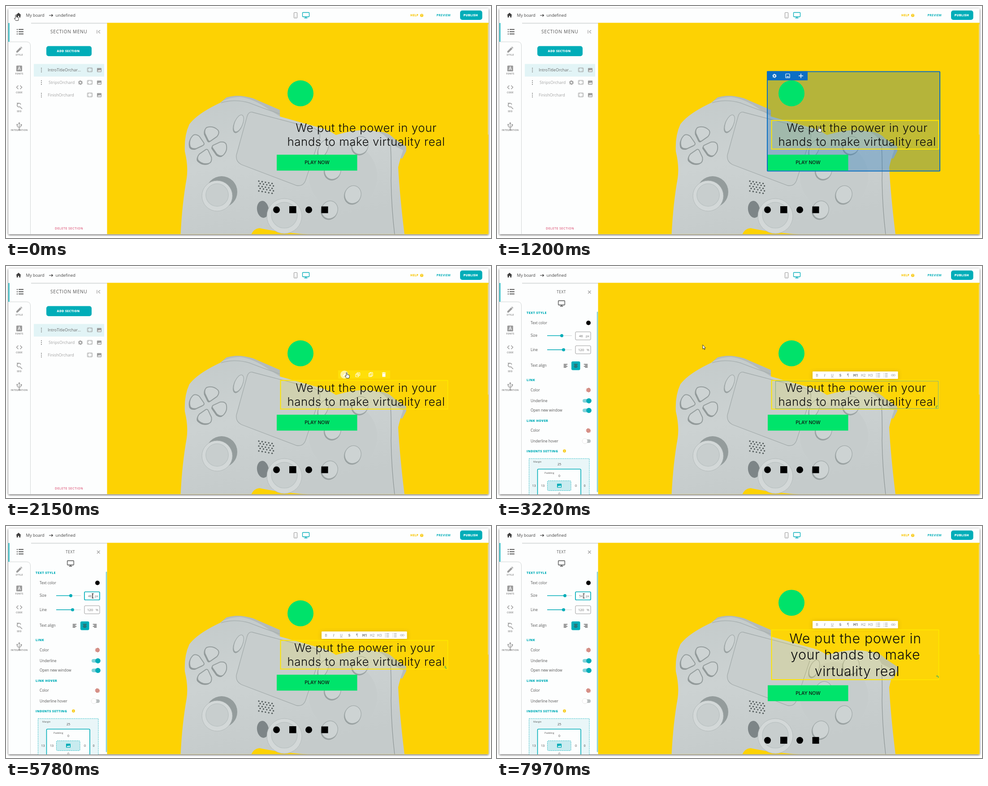
An HTML page that plays this animation: 1082 by 518 pixels, repeating every 8000 ms.

```html
<!DOCTYPE html>
<html lang="en">
<head>
<meta charset="utf-8">
<title>Page editor</title>
<style>
html, body { margin: 0; width: 100%; height: 100%; overflow: hidden; background: #fff; }
svg { display: block; width: 100vw; height: 100vh; font-family: "Open Sans", sans-serif; }
.head { font-family: Inter, sans-serif; font-weight: 300; letter-spacing: .021em; }
.play { font-family: Inter, sans-serif; }
</style>
</head>
<body>
<svg id="stage" viewBox="0 0 1082 518"></svg>
<script>
const TEAL = '#00adb8', GREY = '#9c9c9c', DARK = '#484848', YELLOW = '#fdd203', LEMON = '#ffe500';
const LOOP = 8000;
const stage = document.getElementById('stage');

// Markup helpers
const text = (x, y, s, size, fill = '#666', o = {}) =>
  `<text x="${x}" y="${y + size * .36}" font-size="${size}" fill="${fill}" font-weight="${o.w || 400}"
    text-anchor="${o.mid ? 'middle' : 'start'}" letter-spacing="${o.ls || 0}" ${o.more || ''}>${s}</text>`;
const rect = (x, y, w, h, fill, r = 0, more = '') =>
  `<rect x="${x}" y="${y}" width="${w}" height="${h}" rx="${r}" fill="${fill}" ${more}/>`;
const disc = (x, y, r, fill, more = '') => `<circle cx="${x}" cy="${y}" r="${r}" fill="${fill}" ${more}/>`;
const oval = (x, y, rx, ry, turn, fill, more = '') =>
  `<ellipse cx="${x}" cy="${y}" rx="${rx}" ry="${ry}" transform="rotate(${turn} ${x} ${y})" fill="${fill}" ${more}/>`;
const shape = (d, fill, more = '') => `<path d="${d}" fill="${fill}" ${more}/>`;
const line = (d, c, w = 1, more = '') =>
  `<path d="${d}" fill="none" stroke="${c}" stroke-width="${w}" ${more}/>`;
const group = (id, s, more = '') => `<g id="${id}" ${more}>${s}</g>`;
const at = (x, y, s) => `<g transform="translate(${x} ${y})">${s}</g>`;

// Icons, drawn around their centre
const picture = (x, y, c, hole) => at(x, y, rect(-5, -4.5, 10, 9, c, 1) +
  shape('M-4 3L-1.6 0L0 1.7L2 -1L4.2 3Z', hole));
const frame = (x, y) => at(x, y, rect(-5.5, -4.5, 11, 9, 'none', 1, `stroke="${GREY}"`) +
  line('M-3.5 -1V-2.7H-1.5M1.5 -2.7H3.5V-1M3.5 1V2.7H1.5M-1.5 2.7H-3.5V1', GREY, .9));
const gear = (x, y, c, k = 1) => at(x, y, disc(0, 0, 3.2 * k, 'none', `stroke="${c}" stroke-width="${2 * k}"`) +
  disc(0, 0, 4.6 * k, 'none', `stroke="${c}" stroke-width="${1.4 * k}" stroke-dasharray="${2.4 * k} ${2.42 * k}"`));
const monitor = (x, y, c, w) => at(x, y, rect(-w / 2, -6, w, 9.5, 'none', 1, `stroke="${c}" stroke-width="1.3"`) +
  line('M0 3.5V6M-3.5 6.2H3.5', c, 1.4));
const dots = (x, y) => [-4, 0, 4].map(d => disc(x, y + d, 1.1, '#777')).join('');
const alignIcon = (x, y, c, side) => [8.5, 6, 8.5, 6].map((w, i) => {
  const dx = side * (8.5 - w) / 2;
  return rect(x - w / 2 + dx, y - 4.2 + i * 2.3, w, 1.2, c);
}).join('');
const caps = (x, y, s, fill = TEAL, size = 7, ls = .5) => text(x, y, s, size, fill, { w: 800, ls });

function controller() {
  const edge = 'stroke="#a3abab" stroke-width="1.3"';
  const key = (x, y, rx, ry, turn) => oval(x - 1, y + 2, rx + .8, ry + .8, turn, '#969e9e') +
    oval(x, y, rx, ry, turn, '#cdd3d3', edge);
  const padShape = 'M-13 -38Q0 -46 13 -38Q18 -33 14 -24L3 -11Q0 -8 -3 -11L-14 -24Q-18 -33 -13 -38Z';
  const pad = turn => `<g transform="rotate(${turn})">` + shape(padShape, '#cdd3d3', 'stroke="#959d9d" stroke-width="2"') + '</g>';
  const padShade = turn => `<g transform="translate(-2 2.5) rotate(${turn})">` + shape(padShape, '#8f9797') + '</g>';
  const turns = [15, 105, 195, 285];
  const grip = (x, y, r) => disc(x, y, r, '#d3d8d8', 'stroke="#b4bbbb"') +
    disc(x, y - 2, r * .74, '#c8cece', 'stroke="#bcc4c4" stroke-width="1.5"');
  let s = shape('M492 204Q518 196 551 206L611 232V248L560 240L478 216Z', '#b4bbbb') +
    shape('M828 281Q850 279 866 296L893 314V324L884 341L850 330Z', '#b6bdbd') +
    shape('M389.500 510Q393 440 403 385Q407 358 399 325Q397 290 409 264Q427 240 478 216Q492 204 522 203Q552 207 585 230L612 247L694 270Q718 275 736 288Q792 271 830 281Q849 288 858 308L886 322Q879 342 875 360Q878 420 889 510Z', 'url(#shell)') +
    shape('M547 511Q552 497 566 496Q610 506 690 511Z', YELLOW) +
    line('M858 310Q860 350 859 390Q860 450 867 510', '#8c9494', 1.2) +
    line('M480 216Q510 207 542 216Q575 229 611 241', '#a9b1b1', 1.5) +
    shape('M549 237L687 273Q703 280 700 294L668 390Q663 403 649 401L525 354Q512 347 514 333L538 246Q541 236 549 237Z',
      '#c7cdcd', edge) +
    disc(752, 380, 76, '#c6cccc');
  s += at(451, 311, turns.map(padShade).join('') + turns.map(pad).join(''));
  s += key(519, 262, 9, 20, 22) + key(708, 318, 10, 20, 22);
  s += [[790, 311], [729, 367], [774, 421], [722, 455]].map(p => key(...p, 18, 20, 20)).join('');
  for (let r = 0; r < 5; r++)
    for (let c = 0; c < 5; c++)
      s += disc(564 + c * 7.4 + r % 2 * 3, 391 + r * 5.5 + c * 1.3, 1.7, '#555d5d');
  return s + disc(481, 415, 35, '#949c9c') + grip(471, 424, 34) + oval(573, 454, 13, 19, -8, '#7d8587') + grip(621, 469, 39);
}

function chrome() {
  const rail = [[110, 'STYLE'], [152, 'FONTS'], [194, 'CODE'], [236, 'SEO'], [278, 'INTEGRATION']];
  return shape('M28 15L34 20.5H32.3V25.5H29.3V22H26.7V25.5H23.7V20.5H22Z', '#3d3d3d') +
    text(44.5, 20.5, 'My board', 9.3, '#444') + line('M96 21H104M101.5 18.5L104.3 21L101.5 23.5', '#333', 1.2) +
    text(110.5, 20.5, 'undefined', 9.3, '#444') +
    rect(642.5, 14.5, 7, 12.5, 'none', 1.2, `stroke="${GREY}" stroke-width="1.2"`) + rect(645, 24.5, 2, 1, GREY) +
    monitor(669, 20.5, TEAL, 15) +
    caps(902, 21, 'HELP', '#f8cb1c', 6.7, .3) + disc(927.5, 21, 3.6, '#f8cb1c') +
    text(927.5, 21, '?', 5.5, '#fff', { w: 700, mid: 1 }) + text(960.5, 20.5, 'PREVIEW', 6.6, TEAL, { w: 700, ls: .4 }) +
    rect(1013, 10, 49.5, 21, TEAL, 5) + caps(1020.5, 20.5, 'PUBLISH', '#fff', 7, .3) +
    line('M56 38.5H226', '#d9dddd', 2) + rect(5.5, 38, 2, 42, TEAL) +
    line('M7 80H46Q54.500 80 54.500 89V510', '#d2d5d5') +
    [52.5, 57.5, 62.5].map(y => rect(24, y - 1, 2, 2, DARK) + rect(28, y - 1, 11, 1.8, DARK)).join('') +
    rail.map(([y, s]) => text(29.5, y - 1, s, 5.1, '#8e8e8e', { w: 700, mid: 1, ls: .3 })).join('') +
    shape('M23 104V101L31.500 92.500L34.500 95.500L26 104ZM32.300 91.700L33.500 90.500L36.500 93.500L35.300 94.700Z', GREY) +
    rect(23, 133, 13, 13, GREY, 1.5) + text(29.5, 139.5, 'A', 10, '#fff', { w: 600, mid: 1 }) +
    line('M27.500 177.500L23.500 181.500L27.500 185.500M31.500 177.500L35.500 181.500L31.500 185.500', GREY, 1.5) +
    line('M33 220A4.200 4.200 0 1 0 31 225L36 230M24 217H28', GREY, 1.6) +
    line('M29.500 261V275M25 265V268Q25 270 29.500 271Q34 270 34 266', GREY, 1.4) +
    shape('M27 263L29.500 259L32 263Z', GREY) + disc(29.5, 276, 1.9, GREY) + rect(32.5, 264, 3, 3, GREY) + disc(25, 265, 1.7, GREY);
}

function menu() {
  const row = (x, y, s, c) => dots(79, y) + text(x, y, s, 9, c) + frame(187, y - .5) + picture(208, y, GREY, '#fff');
  return text(99, 57, 'SECTION MENU', 10, '#555', { ls: .8 }) +
    line('M203 53.500V61.500M210 54L206 57.500L210 61', GREY, 1.2) +
    rect(90, 89.5, 101, 22.5, TEAL, 5) + caps(113.5, 100.5, 'ADD SECTION', '#fff', 6.8, .45) +
    rect(62, 129.5, 157, 28, '#e2f4f6') + row(93, 143, 'IntroTitleOrchar...', '#666') +
    row(95, 171, 'StripsOrchard', '#a3a3a3') + gear(166, 171, GREY, .95) + row(93, 199, 'FinishOrchard', '#a3a3a3') +
    text(109, 497, 'DELETE SECTION', 6.9, '#de5c7c', { w: 600, ls: .6 });
}

function settings() {
  const label = (y, s) => text(75, y, s, 8.2, '#555');
  const slider = (y, x, id) => line(`M112 ${y}H167`, '#cfd4d4') +
    group(id, line(`M112 ${y}H${x}`, TEAL, 1.3) + disc(x, y, 3.5, TEAL));
  const field = (y, v, unit, id) => rect(175, y - 9, 34, 18, '#fff', 2, `id="${id}Box" stroke="#9a9a9a"`) +
    text(183 - (v > 99) * 2, y, v, 7.6, '#666', { more: `id="${id}"` }) + text(198 + (v > 99) * 2, y + .5, unit, 7.2, '#777');
  const swatch = y => disc(204, y, 5, '#f3d9d2') + disc(204, y, 5, 'url(#checks)');
  const toggle = (y, on) => rect(191, y - 4, 18, 8, on ? '#7fd2d9' : '#b9bdbd', 4) +
    disc(on ? 205 : 196, y, 5.8, on ? TEAL : '#fff', on ? '' : 'stroke="#ddd" stroke-width=".7"');
  const num = (x, y, s) => text(x, y, s, 7.2, '#444', { mid: 1 });
  const dash = `stroke="${TEAL}" stroke-width=".8" stroke-dasharray="2.5 1.5"`;
  return text(143.5, 58.5, 'TEXT', 8.2, '#555', { mid: 1, ls: .5 }) +
    line('M203 55L209.500 61.500M209.500 55L203 61.500', GREY, 1.2) + monitor(144, 83.5, DARK, 14.5) +
    caps(66, 104, 'TEXT STYLE') + label(127, 'Text color') + disc(204, 127, 5, '#000') +
    label(155.5, 'Size') + slider(155.5, 144.5, 'knob') + field(156, 46, 'px', 'size') +
    label(187, 'Line') + slider(187, 148.5, 'lineKnob') + field(187, 120, '%', 'height') +
    label(222.5, 'Text align') + rect(166, 213, 19.5, 19.5, TEAL, 3) +
    alignIcon(153, 223, DARK, -1) + alignIcon(175.7, 223, DARK, 0) + alignIcon(198, 223, DARK, 1) +
    caps(66, 254, 'LINK') + label(277, 'Color') + swatch(277) +
    label(301, 'Underline') + toggle(301, true) + label(322.5, 'Open new window') + toggle(322.5, true) +
    caps(66, 345, 'LINK HOVER') + label(367, 'Color') + swatch(367.5) +
    label(391, 'Underline hover') + toggle(391, false) + caps(66, 413, 'INDENTS SETTING') +
    disc(150.5, 413, 3.4, '#f8cb1c') + text(150.5, 413, 'i', 5, '#fff', { w: 700, mid: 1 }) +
    rect(71.5, 430, 134.5, 90, '#e9f6f8', 0, dash) + text(81, 437, 'Margin', 5.7, '#555') + num(139, 442.5, 25) +
    rect(90.5, 453.5, 96.5, 70, '#fdfefe', 2, `stroke="${TEAL}" stroke-width="1.6"`) +
    text(106, 462, 'Padding', 5.7, '#555') + num(139, 468.5, 0) +
    rect(112.5, 479.5, 52.5, 22, '#c8ebef', 2, dash) + picture(139, 490.5, TEAL, '#fff') +
    num(82.5, 490, 13) + num(102, 490, 13) + num(176, 490, 0) + num(195.5, 490, 0) + num(139, 508.5, 0) +
    rect(222.7, 102, 2.8, 403, '#84d3da', 1.4);
}

function sectionFrame() {
  const blue = '#0b6ec4';
  return rect(603, 146.5, 385, 222, 'rgb(16 110 186 / .3)', 1, `stroke="${blue}" stroke-width="2"`) +
    rect(602, 145.5, 91, 20.5, blue, 1) + gear(619, 156, '#fff', .85) +
    rect(644, 151.5, 9, 9, 'none', 1, 'stroke="#fff" stroke-width="1.2"') + shape('M645.500 159L647.500 156.500L649 158L650.200 156.800L651.800 159Z', '#fff') +
    line('M678 151V161M673 156H683', '#fff', 1.5);
}

function hoverTools() {
  const w = 'stroke="#fff" stroke-width="1.1"';
  return rect(741, 233, 116, 18.5, '#ffdf08', 1) + disc(755, 242.5, 9, '#fff3a0') + line('M752 246L758 240', '#fff', 2.4) +
    rect(780, 241, 6.5, 6.5, 'none', 1, w) + rect(783, 238, 6.5, 6.5, 'none', 1, w) + line('M786.200 239.500V243M784.500 241.200H788', '#fff') +
    rect(809.5, 239, 6, 8, 'none', 1, w) + rect(812, 237.5, 6, 8, 'none', 1, w) +
    shape('M839.500 240H846.500V247.500H839.500ZM838.700 237.800H841.500L842 237H844L844.500 237.800H847.300V239.200H838.700Z', '#fff');
}

function formatBar() {
  const mark = (x, s, c = '#a9a9a9', more = '') => text(x, 244, s, 8, c, { w: 600, mid: 1, more });
  const list = (x, bullet) => [-3.5, 0, 3.5].map(d => rect(x - 4.5, 243.5 + d, bullet, 1.2, '#999') + rect(x - 1.5, 243.5 + d, 6, 1.1, '#999')).join('');
  return rect(704, 235.5, 190.5, 16.5, '#fff', 1, 'filter="url(#soft)"') +
    mark(714, 'B') + mark(731, 'I', '#888', 'font-style="italic"') + mark(748, 'U', '#a9a9a9', 'text-decoration="underline"') +
    mark(766, 'S', '#777', 'text-decoration="line-through"') + mark(783, '¶') + mark(800, 'H1', '#444') +
    mark(817, 'H2') + mark(833, 'H3') + list(850, 1.6) + list(867, 1) +
    rect(879.7, 242, 4.5, 3.6, 'none', 1.8, 'stroke="#aaa"') + rect(883.8, 242, 4.5, 3.6, 'none', 1.8, 'stroke="#aaa"');
}

const pointer = 'stroke="#222" stroke-width=".9" stroke-linejoin="round"';
stage.innerHTML = `<defs>
  <linearGradient id="shell" x1="0" y1="0" x2=".3" y2="1"><stop offset="0" stop-color="#c3caca"/><stop offset=".5" stop-color="#ccd2d2"/><stop offset="1" stop-color="#c5cbcb"/></linearGradient>
  <pattern id="checks" width="4" height="4" patternUnits="userSpaceOnUse">${rect(0, 0, 2, 2, '#b8473c') + rect(2, 2, 2, 2, '#b8473c')}</pattern>
  <filter id="shadow" x="-5%" y="-5%" width="110%" height="110%"><feDropShadow dx="0" dy="1.3" stdDeviation="2" flood-color="#000" flood-opacity=".75"/></filter>
  <filter id="soft" x="-10%" y="-80%" width="120%" height="260%"><feDropShadow dx="0" dy="1" stdDeviation="4" flood-color="#604800" flood-opacity=".3"/></filter>
  <clipPath id="view">${rect(225.5, 37.5, 851, 472, '#fff')}</clipPath>
  <clipPath id="window">${rect(5, 5, 1072, 505, '#fff', 2)}</clipPath></defs>` +
  rect(0, 0, 1082, 518, '#fff') + rect(5.5, 5.5, 1071, 504, '#fdfefe', 1, 'filter="url(#shadow)"') +
  `<g clip-path="url(#window)">${chrome() + group('menu', menu()) + group('settings', settings())}</g>
  <g clip-path="url(#view)">` + rect(225, 37, 852, 473, YELLOW) + controller() + rect(1075, 41, 2, 246, '#e9dfa8') +
  group('section', sectionFrame()) +
  group('up', disc(657, 195, 29, '#00e26a') + group('tools', hoverTools()) + group('format', formatBar())) +
  rect(612.5, 255.5, 373, 64, 'rgb(255 226 30 / .16)', 0, `id="textBox" stroke="${LEMON}" stroke-width="2"`) +
  rect(621.5, 257, 363, 61.5, 'none', 0, 'id="focus" stroke="#7fae86"') +
  [0, 1, 2].map(i => `<text id="line${i}" class="head" text-anchor="middle" fill="#0b0b0b"/>`).join('') +
  group('spin', line('M0 -2.500A2.500 2.500 0 0 1 0 2.500', '#35a86b', 1.3)) +
  group('down', rect(604, 332, 179.5, 35.5, '#00e46b') +
    text(694, 349.5, 'PLAY NOW', 10.4, '#111', { w: 500, mid: 1, more: 'class="play"' }) +
    disc(603.5, 455, 7.5, '#000') + rect(632, 447, 15.5, 15.5, '#000') + disc(675.5, 455, 7.5, '#000') + rect(703.5, 447.5, 15, 15, '#000')) +
  '</g>' + line('M193 151V161', '#333', .8, 'id="caret"') +
  group('cursor',
    group('hand', shape('M-2.500 1V-5.500Q-1.500 -7.500 -.5 -5.500V-1.500L3.500 -.7Q5 -.2 4.800 1.500L3.800 6.500H-1.700L-5 2Q-5 .2 -2.500 2Z', '#fff', pointer)) +
    group('arrow', shape('M-2.500 -5V4.500L-.3 2.500L1.300 6L2.700 5.300L1.200 2H4Z', '#fff', pointer)) +
    group('beam', line('M-2.200 -5H-.6L0 -4.400L.6 -5H2.200M0 -4.400V4.400M-2.200 5H-.6L0 4.400L.6 5H2.200', '#222', 1.1)));

const el = id => document.getElementById(id);
const show = (id, on) => el(id).setAttribute('visibility', on ? 'visible' : 'hidden');
const move = (id, x, y, turn = 0) => el(id).setAttribute('transform', `translate(${x} ${y}) rotate(${turn})`);
const set = (id, o) => { for (const k in o) el(id).setAttribute(k, o[k]); };

const smooth = u => u * u * (3 - 2 * u), start = u => u * u, stop = u => 1 - (1 - u) * (1 - u);
// time, x, y, easing towards this point
const path = [[590, 23.5, 26], [1200, 719.5, 275, smooth], [1540, 719.5, 275, smooth], [1950, 761.5, 244, smooth],
  [2760, 761.5, 244, smooth], [3220, 462, 181, start], [4060, 193.5, 156, stop]];
const steps = [6090, 6270, 6450, 6640, 6920, 7200, 7480, 7810];

function cursorAt(t) {
  const i = path.findIndex(p => p[0] > t);
  if (i === 0) return path[0].slice(1);
  if (i < 0) return path[path.length - 1].slice(1);
  const [t0, x0, y0] = path[i - 1], [t1, x1, y1, ease] = path[i];
  const u = ease((t - t0) / (t1 - t0));
  return [x0 + (x1 - x0) * u, y0 + (y1 - y0) * u];
}

function wrap(size) {
  if (size < 48) return ['We put the power in your', 'hands to make virtuality real'];
  if (size < 53) return ['We put the power in your', 'hands to make virtuality', 'real'];
  return ['We put the power in', 'your hands to make', 'virtuality real'];
}

function render(t) {
  const [x, y] = cursorAt(t);
  const edit = t >= 2700, tools = t >= 1520 && !edit, focused = t >= 4400;
  const inside = x > 602 && y > 146;
  const size = 46 + steps.filter(s => t >= s).length;
  const lines = wrap(size), font = size * .5618, lead = font * 1.2;
  const grow = (lines.length * lead - 62) / 2;

  show('menu', !edit);
  show('settings', edit);
  show('section', inside && t < 1520);
  show('tools', tools);
  show('format', edit);
  show('textBox', edit || tools || (inside && y > 255));
  show('focus', edit && !focused);
  show('spin', edit);

  move('up', 0, -grow);
  move('down', 0, grow);
  set('textBox', { y: 255.5 - grow, height: 64 + 2 * grow });
  move('spin', 982, 315 + grow * .95, t * .4);
  for (let i = 0; i < 3; i++) {
    const shift = edit && i < lines.length - 1 ? font * .13 : 0;
    set('line' + i, { x: 803.5 - shift, y: 287.5 + (i - (lines.length - 1) / 2) * lead + font * .3585, 'font-size': font });
    el('line' + i).textContent = lines[i] || '';
  }

  const knob = 144.5 + (size - 46) * .875;
  el('knob').innerHTML = line(`M112 155.500H${knob}`, TEAL, 1.3) + disc(knob, 155.5, 3.5, TEAL);
  el('size').textContent = size;
  set('sizeBox', { stroke: t >= 4050 ? TEAL : '#9a9a9a', 'stroke-width': focused ? 1.7 : 1 });
  show('caret', focused && (t - 4400) % 1000 < 500);

  const beam = edit && x < 209, hand = !edit && (t < 650 || inside);
  move('cursor', x, y);
  show('beam', beam);
  show('hand', hand);
  show('arrow', !beam && !hand);
}

function tick() {
  render(performance.now() % LOOP);
  requestAnimationFrame(tick);
}
tick();
</script>
</body>
</html>
```
